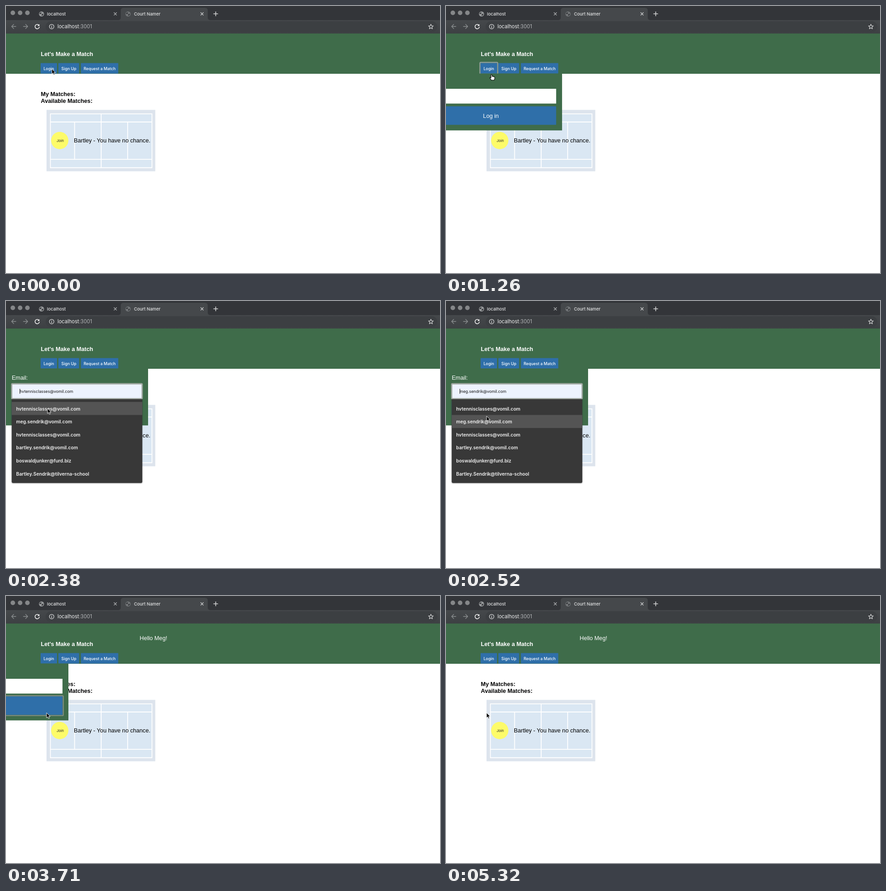
An HTML page for the animation above (5390 ms loop, 953 px wide and 587 px high).

```html
<!DOCTYPE html>
<html lang="en">
<head>
<meta charset="utf-8">
<title>Court booking demo</title>
<style>
  html, body { margin: 0; width: 100%; height: 100%; overflow: hidden; background: #fff; }
  svg { display: block; }
  text { font-family: "Liberation Sans", Arial, sans-serif; font-size: 12.65px; white-space: pre; }
  .ui { font-family: Inter, Roboto, sans-serif; }
  .bold { font-weight: 700; }
  .mid { text-anchor: middle; }
  .tab { font-size: 9.5px; font-weight: 500; fill: #e3e4e5; }
  .btn { font-size: 8.8px; font-weight: 500; fill: #fff; }
  .field { font-size: 8.8px; }
  .item { font-size: 10.2px; font-weight: 600; fill: #f2f2f2; }
  .white { fill: #fff; }
  .blue { fill: #2f6fa9; }
  .green { fill: #3f6c4a; }
  .line { fill: none; stroke-linecap: round; stroke-linejoin: round; }
</style>
</head>
<body>
<svg width="953" height="587" viewBox="0 0 953 587">
  <defs>
    <linearGradient id="bar" x2="0" y2="1">
      <stop stop-color="#45484b"/><stop offset="1" stop-color="#3d4043"/>
    </linearGradient>
    <filter id="glow" x="-20%" y="-20%" width="140%" height="140%"><feGaussianBlur stdDeviation=".6"/></filter>
    <filter id="drop" x="-10%" y="-10%" width="120%" height="120%">
      <feDropShadow dx="0" dy="1" stdDeviation="1.2" flood-opacity=".4"/>
    </filter>
    <g id="globe">
      <circle r="5.6"/>
      <path d="M-3.8 -2.8 Q-1 -4 .4 -2.6 L-.8 -.6 L-3 .3 L-4.6 -.6 Z M1.2 .2 L4.2 -.8 L3.4 2.6 L1.4 4 L-.4 2.2 Z" fill="#35373a"/>
    </g>
    <path id="cross" d="M-2.8 -2.8 L2.8 2.8 M2.8 -2.8 L-2.8 2.8"/>
    <path id="back" d="M4.8 0 H-4.6 M0 -4.7 L-4.7 0 L0 4.7"/>
  </defs>

  <rect width="953" height="587" fill="#fff"/>

  <g id="browser">
    <rect width="953" height="31" fill="#333539"/>
    <rect y="31" width="953" height="30" fill="url(#bar)"/>
    <path d="M246 31 Q252 31 252 25 V10 Q252 4 258 4 H437 Q443 4 443 10 V25 Q443 31 449 31 Z" fill="#45484b"/>
    <rect x="87" y="33.5" width="860" height="24" rx="12" fill="#3c3f42"/>
    <g fill="#858789">
      <circle cx="15" cy="15" r="5"/><circle cx="31" cy="15" r="5"/><circle cx="47" cy="15" r="5"/>
    </g>
    <use href="#globe" x="78" y="17.5" fill="#97999b"/>
    <use href="#globe" x="268" y="17.5" fill="#717477"/>
    <text class="ui tab" x="90" y="20.6">localhost</text>
    <text class="ui tab" x="281" y="20.6">Court Namer</text>
    <g class="line" stroke="#d6d7d8" stroke-width="1.3">
      <use href="#cross" x="240" y="17.3" stroke="#b2b4b6"/><use href="#cross" x="430.5" y="17.3"/>
      <path d="M456 17.3 H465 M460.5 12.8 V21.8" stroke-width="1.6"/>
      <use href="#back" x="17" y="45" stroke="#8b8e90"/>
      <use href="#back" transform="translate(43 45) scale(-1 1)" stroke="#8b8e90"/>
      <path d="M72.4 42.4 A4.8 4.8 0 1 0 73.2 46.4" stroke="#f1f1f1" stroke-width="1.6"/>
      <path d="M73.4 39.8 V44 H69.2 Z" fill="#f1f1f1" stroke="none"/>
      <circle cx="100.3" cy="45.3" r="5"/>
      <path d="M100.3 45 V48 M100.3 42.7 V42.8" stroke-width="1.4"/>
      <path id="star" stroke-width="1.2"/>
    </g>
    <text class="ui" x="113" y="49.3" style="font-size:11.1px" fill="#f0f0f1">localhost<tspan fill="#b4b6b8">:3001</tspan></text>
  </g>

  <g id="page">
    <rect class="green" y="60.5" width="953" height="88.5"/>
    <text class="bold white" x="76.5" y="109.7">Let's Make a Match</text>
    <text class="white" id="hello" x="293.5" y="97.2">Hello Meg!</text>
    <rect class="blue" x="76" y="125.5" width="36" height="23" rx="1"/>
    <rect class="blue" x="115" y="125.5" width="45.5" height="23" rx="1"/>
    <rect class="blue" x="164.5" y="125.5" width="82" height="23" rx="1"/>
    <rect id="tabRing" class="line" x="74.5" y="124" width="39" height="26" rx="2" stroke="#8d9d9b" stroke-width="2.4" filter="url(#glow)"/>
    <text class="ui btn mid" x="94" y="141">Login</text>
    <text class="ui btn mid" x="138" y="141">Sign Up</text>
    <text class="ui btn mid" x="205.7" y="141">Request a Match</text>
    <text class="bold" x="76.5" y="198.2">My Matches:</text>
    <text class="bold" x="76.5" y="212.6">Available Matches:</text>
    <rect x="89" y="228.4" width="238.8" height="135" fill="#dde4ed"/>
    <rect x="97.5" y="237.2" width="223" height="118.3" fill="#dae7f3"/>
    <path d="M97.5 237.2 H320.5 V355.5 H97.5 Z M97.5 255 H320.5 M97.5 337.2 H320.5 M209 237 V355 M150.6 255 V337 M267.2 255 V337" fill="none" stroke="#fff" stroke-width="1.8"/>
    <circle cx="118" cy="295.7" r="19" fill="#fdfb69"/>
    <text class="ui mid" x="119" y="298.8" style="font-size:8px" fill="#222">Join</text>
    <text x="149" y="300">Bartley - You have no chance.</text>
  </g>

  <g id="panel">
    <rect class="green" y="148.5" width="312" height="125"/>
    <text class="white" x="12.7" y="172.7">Email:</text>
    <rect id="field" x="12.5" y="182" width="286.5" height="32.5"/>
    <rect id="fieldRing" class="line" x="12.5" y="182" width="286.5" height="32.8" rx="1.5" stroke="#a0a8a1" stroke-width="2.8" filter="url(#glow)"/>
    <text class="ui field" id="value" x="30" y="202"></text>
    <rect id="caret" y="193" width="1" height="11" fill="#111"/>
    <rect class="blue" x="12.5" y="220.5" width="286.5" height="40.8" rx="1"/>
    <rect id="loginRing" class="line" x="11.5" y="219.3" width="289.3" height="43.6" rx="2" stroke="#7c8b80" stroke-width="2.4" filter="url(#glow)"/>
    <text class="white mid" x="155.7" y="245.8">Log in</text>
  </g>

  <g id="list">
    <path d="M12.5 215.8 H299.3 V397 Q299.3 400 296.3 400 H15.5 Q12.5 400 12.5 397 Z" fill="#393939" filter="url(#drop)"/>
    <rect id="hover" x="12.5" width="286.8" height="28.6" fill="#545454"/>
  </g>

  <g id="cursor">
    <g id="click" class="line">
      <circle r="13" stroke="#fff" stroke-width="3" stroke-opacity=".6"/>
      <circle r="13" stroke="#111" stroke-width="1.5"/>
    </g>
    <path id="arrow" d="M0 0 V11.2 L2.6 8.8 L4.3 12.8 L6.3 12 L4.6 8.1 H8.1 Z" fill="#000" stroke="#fff" stroke-width=".9"/>
    <path id="hand" d="M-1.2 1 Q0 -.8 1.2 1 V4.4 Q2.5 3.4 3.4 4.8 Q4.7 4 5.4 5.3 Q7 4.8 7 6.8 V8.8 Q6.8 10.6 5.8 12.6 H-.4 Q-1.5 10.4 -3.7 8.3 Q-4.4 6.6 -2.7 6.7 L-1.2 8 Z" fill="#fff" stroke="#000" stroke-width="1.1" stroke-linejoin="round"/>
    <path id="beam" class="line" d="M-2.3 -6 Q0 -6 0 -4.6 Q0 -6 2.3 -6 M0 -4.6 V4.6 M-2.3 6 Q0 6 0 4.6 Q0 6 2.3 6 M-1.3 2 H1.3" stroke="#111" stroke-width="1"/>
  </g>
</svg>
<script>
const LOOP = 5390, STEP = 70, ROW = 28.6, LIST_TOP = 222;
const $ = id => document.getElementById(id);
const show = (id, on) => { $(id).style.display = on ? '' : 'none'; };
const put = (id, attrs) => { for (const k in attrs) $(id).setAttribute(k, attrs[k]); };

const emails = [
  'hvtennisclasses@vomil.com', 'meg.sendrik@vomil.com', 'hvtennisclasses@vomil.com',
  'bartley.sendrik@vomil.com', 'boswaldjunker@furd.biz', 'Bartley.Sendrik@tilverna-school'
];

emails.forEach((mail, i) => {
  const row = document.createElementNS('http://www.w3.org/2000/svg', 'text');
  row.setAttribute('class', 'ui item');
  row.setAttribute('x', 22.3);
  row.setAttribute('y', 240.5 + i * ROW);
  row.textContent = mail;
  $('list').append(row);
});

const starPoint = (_, i) => {
  const r = i % 2 ? 2.5 : 5.6, a = i * Math.PI / 5;
  return (933 + r * Math.sin(a)).toFixed(2) + ' ' + (45.6 - r * Math.cos(a)).toFixed(2);
};
put('star', { d: 'M' + Array.from({ length: 10 }, starPoint).join('L') + 'Z' });

// cubic-bezier(.25, .1, .25, 1)
function ease(x) {
  if (x <= 0) return 0;
  if (x >= 1) return 1;
  const curve = (s, a, b) => 3 * s * (1 - s) ** 2 * a + 3 * s * s * (1 - s) * b + s ** 3;
  let lo = 0, hi = 1;
  for (let i = 0; i < 24; i++) {
    const mid = (lo + hi) / 2;
    if (curve(mid, .25, .25) < x) lo = mid; else hi = mid;
  }
  return curve(lo, .1, 1);
}

// Pointer stops: time, x, y
const stops = [
  [0, 100.7, 138.5], [910, 100.7, 138.5], [1120, 100, 150.4], [1260, 100, 150.4],
  [1540, 97, 187.8], [2100, 97, 187.8], [2520, 89, 253], [2660, 89, 256.8], [LOOP, 89, 256.8]
];

function pointer(t) {
  const i = stops.findIndex(s => s[0] > t);
  const [t0, x0, y0] = stops[i - 1], [t1, x1, y1] = stops[i];
  const p = (t - t0) / (t1 - t0), s = p * p * (3 - 2 * p);
  return [x0 + (x1 - x0) * s, y0 + (y1 - y0) * s];
}

function shapeAt(t) {
  if (t < 280) return 'arrow';
  if (t < 1330) return 'hand';
  if (t < 2240) return 'beam';
  if (t < 2730) return 'arrow';
  return t < 3570 ? 'hand' : 'arrow';
}

const within = (t, a, b) => t >= a && t < b;

function draw(t) {
  const [x, y] = pointer(t);
  const open = ease((t - 951) / 600) - ease((t - 3515) / 600);
  put('panel', { transform: `translate(${(312 * (open - 1)).toFixed(2)} 0)` });
  show('panel', open > 0.001);

  const listOpen = within(t, 1610, 2730);
  const row = listOpen && y > LIST_TOP ? Math.min(5, Math.floor((y - LIST_TOP) / ROW)) : -1;
  show('list', listOpen);
  show('hover', row >= 0);
  put('hover', { y: LIST_TOP + Math.max(row, 0) * ROW });

  const chosen = within(t, 2730, 3500);
  const mail = chosen ? emails[1] : emails[row];
  const focused = within(t, 1610, 3290);
  $('value').textContent = mail || 'Email';
  put('value', { fill: mail ? '#111' : '#858585' });
  put('field', { fill: mail ? '#edf3fe' : '#fff' });
  show('fieldRing', focused);
  show('caret', focused);
  put('caret', { x: chosen ? 30 + $('value').getComputedTextLength() : 30 });

  show('tabRing', within(t, 490, 1610));
  show('loginRing', within(t, 3290, 4200));
  show('hello', t >= 3500);

  put('cursor', { transform: `translate(${x.toFixed(2)} ${y.toFixed(2)})` });
  const shape = shapeAt(t);
  for (const id of ['arrow', 'hand', 'beam']) show(id, id === shape);
  show('click', within(t, 490, 910) || within(t, 1610, 1820) || within(t, 2660, 2800) || within(t, 3290, 3500));
}

const start = performance.now();
function tick() {
  const t = (performance.now() - start) % LOOP;
  draw(Math.floor(t / STEP) * STEP);
  requestAnimationFrame(tick);
}
tick();
</script>
</body>
</html>
```
